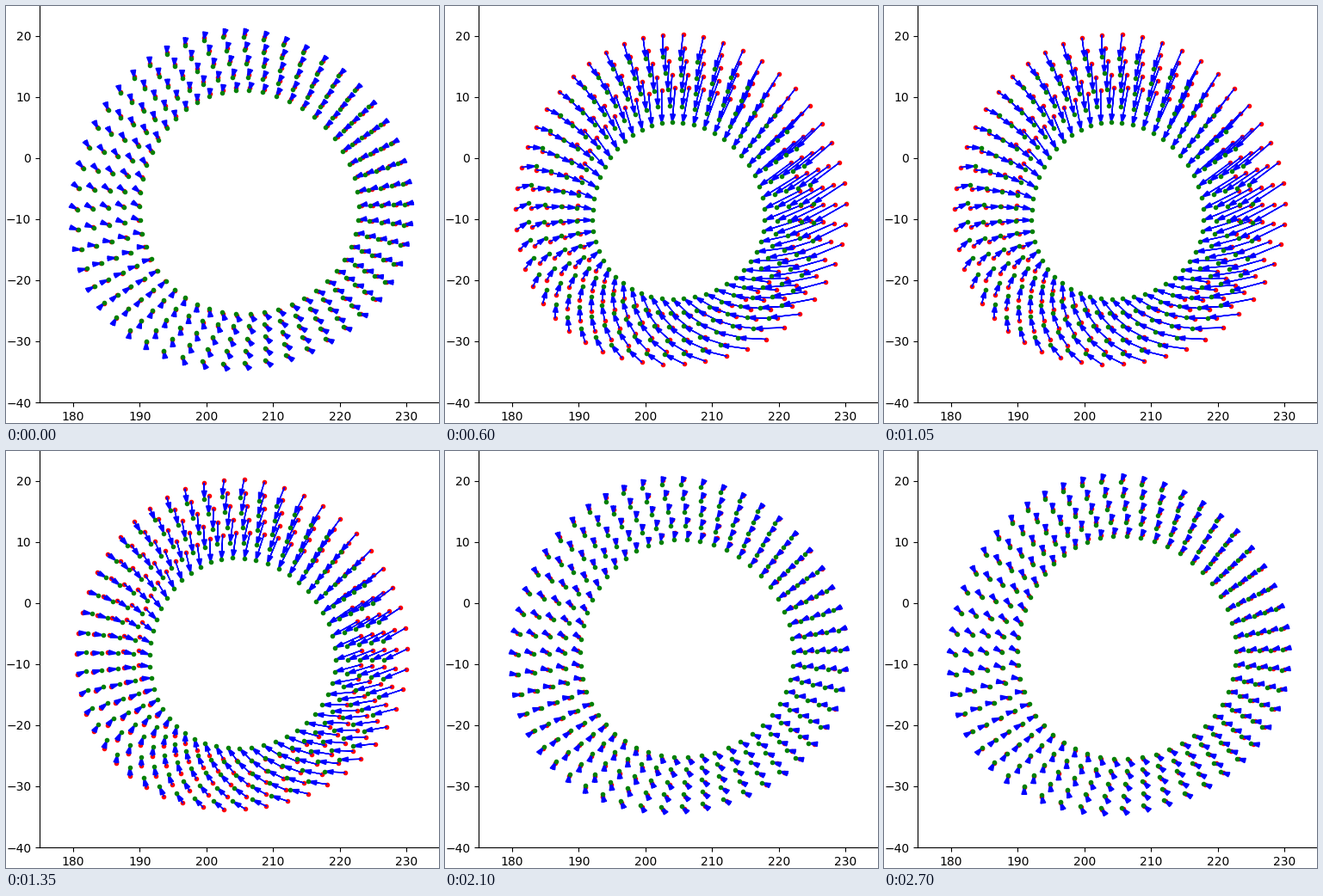
A matplotlib script for the animation above (2.85 s loop, 503x485 px).

```python
import numpy as np
import matplotlib.pyplot as plt
from matplotlib.animation import FuncAnimation
from matplotlib.patches import FancyArrow

W, H, DPI = 503, 485, 100
LEFT, BOTTOM, AX_W, AX_H = 39, 24, 465, 462
SPOKES, RINGS = 50, 5
FRAMES, INTERVAL = 19, 150

# Unit vector turning clockwise with the spokes, and ring depth (outer 0, inner 1).
# Points are complex stage pixels with y down.
turn = np.exp(2j * np.pi * np.arange(SPOKES) / SPOKES)
depth = np.linspace(0, 1, RINGS)[:, None]


def blend(outer, inner):
    return outer + (inner - outer) * depth


def to_data(z):
    """Stage pixels to axes data."""
    z = z.ravel()
    top = H - BOTTOM - AX_H
    return 175 + (z.real - LEFT) * 60 / AX_W, 25 - (z.imag - top) * 65 / AX_H


# A slightly dented ring of points at rest
rest = (blend(269.6 + 229.1j, 279.6 + 229.8j)
        + blend(-13.6 - 191.3j, -8.6 - 130.8j) * turn
        + blend(1.3, -1.4j) / turn
        + (-2.2 - 0.5j) * turn ** 2
        + blend(-2 - 3.6j, -1.4 - 1.8j) / turn ** 2)

# The ring drifts and narrows; its twist builds up late and fades early
squeeze = blend(-11.2 + 7.3j, -11.8 + 10.5j) + blend(1.5 + 22j, 1 + 29.3j) * turn
twist = blend(11.7, 7.3) * turn + blend(-2 - 3.5j, 0) / turn


def displacement(i):
    a = np.interp(i, [0, 1, 2, 4, 5.5, 7, 9, 12, 14, 18],
                  [.08, .17, .45, 1, 1.04, 1, .73, .41, .2, .09])
    return a * squeeze + a ** 2 * twist


fig = plt.figure(figsize=((W + 1e-6) / DPI, (H + 1e-6) / DPI), dpi=DPI,
                 facecolor="white")
ax = fig.add_axes([LEFT / W, BOTTOM / H, AX_W / W, AX_H / H])
ax.set(xlim=(175, 235), ylim=(-40, 25),
       xticks=range(180, 231, 10), yticks=range(-40, 21, 10))

x0, y0 = to_data(rest)
ax.plot(x0, y0, "r.", zorder=0.9)
ends, = ax.plot(x0, y0, "g.", zorder=1.1)
arrows = [ax.add_patch(FancyArrow(x, y, 1, 1, width=0.001, head_width=0.75,
                                  head_length=1.3, length_includes_head=True,
                                  color="b"))
          for x, y in zip(x0, y0)]


def update(i):
    x1, y1 = to_data(rest + displacement(i))
    ends.set_data(x1, y1)
    for arrow, x, y, dx, dy in zip(arrows, x0, y0, x1 - x0, y1 - y0):
        arrow.set_data(x=x, y=y, dx=dx, dy=dy)
    return [ends, *arrows]


anim = FuncAnimation(fig, update, frames=FRAMES, interval=INTERVAL,
                     init_func=lambda: update(0), repeat=True, repeat_delay=0)
plt.show()
```
